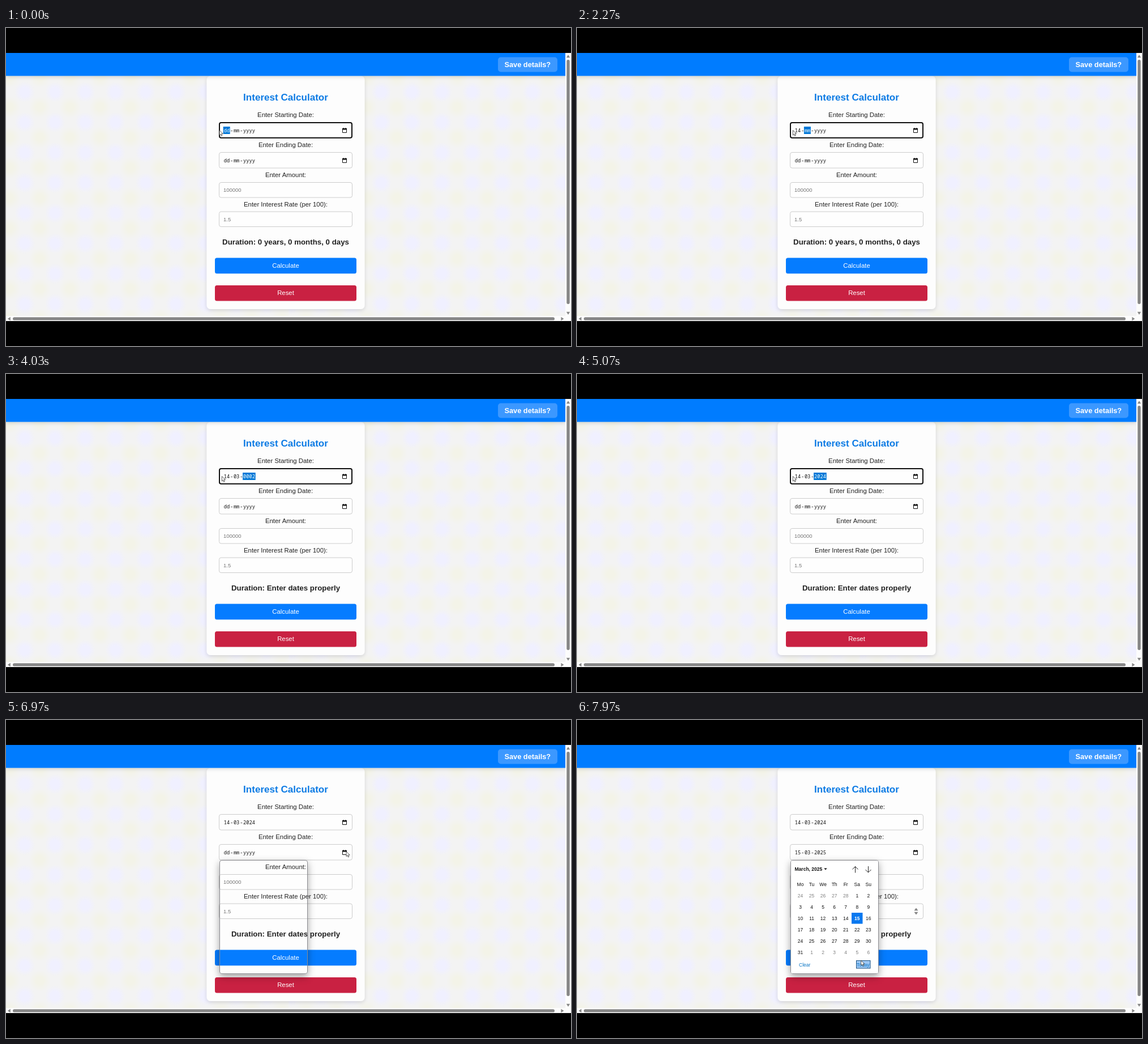
Recreate the animation shown at these times as an HTML page. Size 998 by 561 pixels, loop 8000 ms.

```html
<!DOCTYPE html>
<html lang="en">
<head>
<meta charset="utf-8">
<title>Interest Calculator</title>
<style>
  html, body { margin: 0; width: 100%; height: 100%; overflow: hidden; background: #000; }
  svg { display: block; width: 998px; height: 561px; font: 11.38px "Liberation Sans", Arial, sans-serif; fill: #222; }
  .mid { text-anchor: middle; }
  .bold { font-weight: bold; }
  .white { fill: #fff; }
  .hint { font-size: 9.48px; fill: #757575; }
  .date { font: 500 8.7px "Noto Sans Mono", monospace; fill: #111; }
  .field { fill: #fefefe; stroke: #ccc; }
  .small { font-size: 8.53px; fill: #111; }
  .link { fill: #0b76c4; }
  .popup { position: absolute; box-sizing: border-box; width: 156px; height: 201px; border: 1px solid #8d8d92;
    border-radius: 4px; box-shadow: 0 5px 13px rgba(0, 0, 0, .36); }
</style>
</head>
<body>
<svg viewBox="0 0 998 561">
  <defs>
    <radialGradient id="lavender">
      <stop offset=".45" stop-color="#f0f0ff"/><stop offset="1" stop-color="#f0f0ff" stop-opacity="0"/>
    </radialGradient>
    <radialGradient id="beige">
      <stop offset=".35" stop-color="#f3f3e8"/><stop offset="1" stop-color="#f3f3e8" stop-opacity="0"/>
    </radialGradient>
    <pattern id="dots" x="6.3" y="86.3" width="53.4" height="53.4" patternUnits="userSpaceOnUse">
      <rect width="54" height="54" fill="#f3f3f3"/>
      <g fill="url(#beige)">
        <circle r="19"/><circle cx="53.4" r="19"/><circle cy="53.4" r="19"/><circle cx="53.4" cy="53.4" r="19"/>
      </g>
      <circle cx="26.7" cy="26.7" r="18" fill="url(#lavender)"/>
    </pattern>
    <filter id="soft" x="-10%" y="-30%" width="120%" height="180%">
      <feDropShadow dx="0" dy="2" stdDeviation="3" flood-opacity=".14"/>
    </filter>
    <g id="calendar" fill="#111">
      <path d="M.5 1.5h7v7h-7z" fill="none" stroke="#111"/>
      <path d="M0 1h8v2.4H0zM1.3 0h1.2v1.5H1.3zM5.5 0h1.2v1.5H5.5z"/>
    </g>
  </defs>

  <rect width="998" height="561" fill="#000"/>
  <rect y="44" width="500" height="465" fill="url(#dots)"/>
  <g transform="translate(-10.5)"><rect x="510" y="44" width="489" height="465" fill="url(#dots)"/></g>
  <rect x="354.5" y="84.5" width="279" height="411.5" rx="7" fill="#fdfdfd" filter="url(#soft)"/>
  <rect y="44" width="988" height="40.5" fill="#057cff" filter="url(#soft)"/>
  <rect y="0" width="998" height="44" fill="#000"/>
  <rect x="869" y="51.5" width="105" height="26" rx="5" fill="#3c98ff"/>
  <text class="mid bold white" x="921.3" y="68.5" font-size="12.8">Save details?</text>

  <g class="mid">
    <text class="bold" x="494" y="128" font-size="17.07" style="fill:#0d7be4">Interest Calculator</text>
    <text x="494" y="157">Enter Starting Date:</text>
    <text x="494" y="210">Enter Ending Date:</text>
    <text x="494" y="263">Enter Amount:</text>
    <text x="494" y="315">Enter Interest Rate (per 100):</text>
    <text class="bold" id="duration" x="494" y="382" font-size="13.31"></text>
  </g>

  <g class="field">
    <rect id="startBox" x="376.5" y="166.5" width="235" height="27.5" rx="3.5"/>
    <rect x="376.5" y="219.5" width="235" height="27.5" rx="3.5"/>
    <rect x="376.5" y="272.5" width="235" height="26.5" rx="3.5"/>
    <rect x="376.5" y="324" width="235" height="26.5" rx="3.5"/>
  </g>
  <rect id="focus" x="377" y="167" width="234" height="26.7" rx="3" fill="none" stroke="#101010" stroke-width="2"/>
  <rect id="mark" y="174" height="13" fill="#0078d7"/>
  <g class="date" id="startDate"></g>
  <g class="date" id="endDate"></g>
  <use href="#calendar" x="594" y="176"/>
  <use href="#calendar" x="594" y="229"/>
  <text class="hint" x="384" y="289">100000</text>
  <text class="hint" x="384" y="341">1.5</text>
  <path id="spinner" d="M595.5 336.3l3.5-4.8 3.5 4.8zM595.5 338.7l3.5 4.8 3.5-4.8z" fill="#858585"/>

  <rect x="369" y="405.5" width="250" height="27.7" rx="3.5" fill="#057cff"/>
  <rect x="369" y="454" width="250" height="27.5" rx="3.5" fill="#c92142"/>
  <text class="mid white" x="494" y="423">Calculate</text>
  <text class="mid white" x="494" y="471">Reset</text>

  <path d="M988 44h10v473H0v-9h988z" fill="#fcfcfc"/>
  <g fill="#868686">
    <rect x="990.3" y="56" width="5.4" height="431" rx="2.7"/>
    <rect x="12" y="510.2" width="957" height="5.4" rx="2.7"/>
    <path d="M989.8 52.2l3.2-5 3.2 5zM989.8 500.8l3.2 5 3.2-5zM7.8 509.8l-5 3.2 5 3.2zM980.4 509.8l5 3.2-5 3.2z"/>
  </g>

  <foreignObject id="popupFrame" x="340" y="220" width="240" height="270">
    <div class="popup" style="left:37px;top:27px"></div>
  </foreignObject>
  <g id="picker" class="small">
    <rect x="378" y="248" width="154" height="199" rx="3" fill="#fff"/>
    <text class="bold" x="384.5" y="266">March, 2025</text>
    <path d="M436.3 261.5h5.4l-2.7 3z"/>
    <path d="M491.5 269.5v-11m-5 5l5-5 5 5M514.5 258v11m-5-5l5 5 5-5" fill="none" stroke="#222"/>
    <rect x="485" y="340" width="19.5" height="19.5" fill="#0878f0"/>
    <g id="days" class="mid"></g>
    <text class="link" x="392" y="435">Clear</text>
    <rect id="pressed" x="493.5" y="424.5" width="24.5" height="13.5" fill="#9ec8f5" stroke="#174f80"/>
    <text class="link" x="493.9" y="435">Today</text>
  </g>
  <path id="cursor" d="M0 0v8.6l2-1.8 1.4 3.1 1.5-.7-1.4-3 2.8-.1z" fill="#fff" stroke="#333" stroke-width=".8"/>
</svg>

<script>
  const $ = id => document.getElementById(id);
  const LOOP = 8000, OPEN = 6940, FILLED = 7020, TODAY = 7850;
  const SEGMENTS = [384, 401.2, 418.4];

  const dateSteps = [
    [0, "dd-mm-yyyy", 0], [1450, "01-mm-yyyy", 0], [1800, "14-mm-yyyy", 1],
    [2750, "14-00-yyyy", 1], [3100, "14-03-yyyy", 2], [3800, "14-03-0002", 2],
    [4180, "14-03-0020", 2], [4450, "14-03-0202", 2], [4750, "14-03-2024", 2]
  ];
  const path = [
    [30, 377, 180.5], [530, 381.3, 180.5], [5700, 381.3, 180.5], [6270, 533.5, 231.8],
    [6650, 601, 232], [7150, 601, 232], [7780, 501.7, 424.3]
  ];

  function addText(parent, x, y, text, cls = "") {
    const el = document.createElementNS("http://www.w3.org/2000/svg", "text");
    el.setAttribute("x", x);
    el.setAttribute("y", y);
    el.setAttribute("class", cls);
    el.textContent = text;
    return parent.appendChild(el);
  }

  function makeDate(parent, y) {
    const parts = SEGMENTS.map(x => addText(parent, x + .7, y, ""));
    [396, 413.2].forEach(x => addText(parent, x, y, "-"));
    return text => text.split("-").forEach((s, i) => parts[i].textContent = s);
  }
  const setStart = makeDate($("startDate"), 184);
  const setEnd = makeDate($("endDate"), 237);

  const columnX = i => 394.5 + 20.05 * i;
  ["Mo", "Tu", "We", "Th", "Fr", "Sa", "Su"].forEach((d, i) => addText($("days"), columnX(i), 292.5, d));
  for (let i = 0; i < 42; i++) {
    const day = new Date(2025, 1, 24 + i);
    const selected = day.getMonth() === 2 && day.getDate() === 15;
    const el = addText($("days"), columnX(i % 7), 312.7 + 20.05 * Math.floor(i / 7), day.getDate(), selected ? "bold white" : "");
    if (day.getMonth() !== 2) el.style.fill = "#808080";
  }

  function position(t) {
    const next = path.findIndex(p => p[0] > t);
    if (next === 0) return path[0].slice(1);
    if (next < 0) return path[path.length - 1].slice(1);
    const [a, b] = [path[next - 1], path[next]];
    const k = (t - a[0]) / (b[0] - a[0]);
    const eased = k * k * (3 - 2 * k);
    return [1, 2].map(i => a[i] + (b[i] - a[i]) * eased);
  }

  const show = (id, on) => $(id).style.display = on ? "" : "none";

  function draw(t) {
    const [, text, segment] = dateSteps.filter(s => s[0] <= t).pop();
    const focused = t < 6880;
    setStart(text);
    [...$("startDate").children].forEach((el, i) => el.style.fill = focused && i === segment ? "#fff" : "");
    $("mark").setAttribute("x", SEGMENTS[segment] - .3);
    $("mark").setAttribute("width", segment === 2 ? 22.6 : 12);
    show("mark", focused);
    show("focus", focused);

    setEnd(t < TODAY ? "dd-mm-yyyy" : "15-03-2025");
    $("duration").textContent = "Duration: " + (t < 3800 ? "0 years, 0 months, 0 days" : "Enter dates properly");
    show("popupFrame", t >= OPEN);
    show("picker", t >= FILLED);
    show("pressed", t >= TODAY);
    show("spinner", t >= 7480);
    $("cursor").setAttribute("transform", `translate(${position(t)})`);
  }

  function tick() {
    draw(performance.now() % LOOP);
    requestAnimationFrame(tick);
  }
  tick();
</script>
</body>
</html>
```
